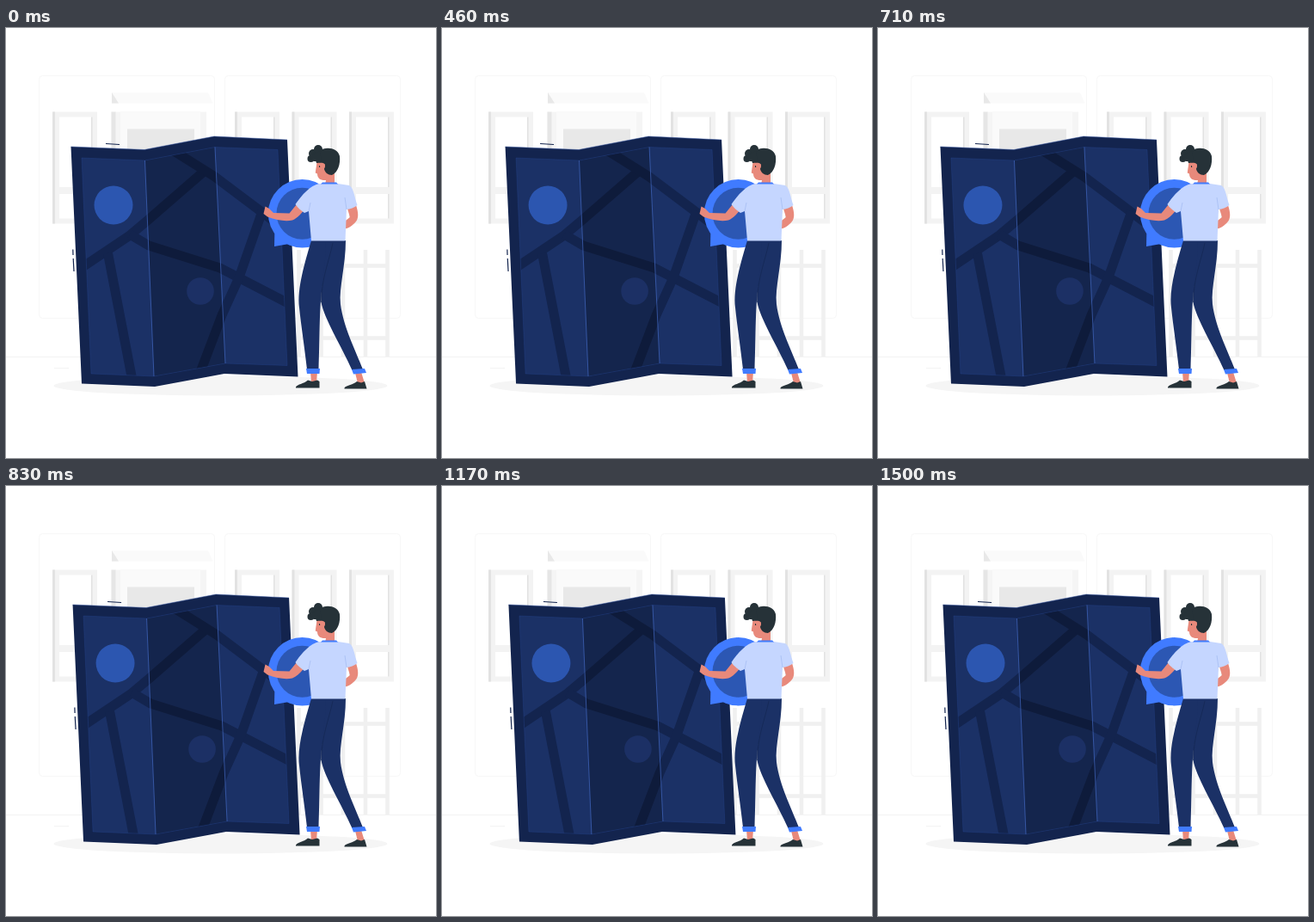
An HTML page for the animation above (1540 ms loop, 500 px wide and 500 px high).

```html
<!DOCTYPE html>
<html lang="en">
<head>
<meta charset="utf-8">
<title>Carrying a folded map</title>
<style>
  html, body { margin: 0; width: 100%; height: 100%; overflow: hidden; background: #fff; }
  svg { display: block; width: 100vw; height: 100vh; }
</style>
</head>
<body>
<svg viewBox="0 0 500 500">
  <defs>
    <g id="window">
      <path fill="#f3f3f3" fill-rule="evenodd" d="M0 97.5H52V227.5H0ZM8 103.5V185H46V103.5ZM8 193V221.5H46V193Z"/>
      <path fill="#e2e2e2" d="M0 97.5H3V227.5H0ZM45 103.5H46.5V185H45ZM45 193H46.5V221.5H45Z"/>
    </g>
    <clipPath id="panels">
      <path d="M88 151L161.500 154L243 138.500L316 141.500L327 392.500L255 390L172 405L99 402Z"/>
    </clipPath>
  </defs>

  <!-- Street -->
  <g fill="#fff" stroke="#f5f5f5" stroke-width=".8">
    <rect x="38.500" y="55.500" width="204" height="282" rx="4"/>
    <rect x="254.500" y="55.500" width="204" height="282" rx="4"/>
    <path d="M0 382.500H500M56 395.500H73" stroke="#f0f0f0"/>
  </g>
  <path fill="#f5f5f5" d="M122.500 97.500H233V200H122.500Z"/>
  <path fill="#e6e6e6" d="M122.500 97.500H127.500V200H122.500Z"/>
  <path fill="#fafafa" d="M133 97.500H226V200H133ZM123 75H235L240.500 87.500H123Z"/>
  <path fill="#e8e8e8" d="M141 117.500H219V200H141ZM123 75L131 87.500H123Z"/>
  <use href="#window" x="54"/>
  <use href="#window" x="266"/>
  <use href="#window" x="332.500"/>
  <use href="#window" x="399"/>
  <path stroke="#f0f0f0" stroke-width="4.500" d="M340.500 258V382M366.500 258V382M392 258V382M418 258V382M443.500 258V382M338 276.500H445M338 360.500H445"/>
  <ellipse cx="249.500" cy="416" rx="194" ry="11.500" fill="#f5f5f5"/>

  <!-- Map -->
  <g id="map">
    <path fill="#13244e" d="M75.500 138L161 141.500L242 126L327 130L339.500 405.500L254 402L173 417L88 413.500Z"/>
    <path fill="none" stroke="#2a4a98" stroke-width=".5" d="M75.500 138L161 141.500L242 126L327 130"/>
    <g clip-path="url(#panels)">
      <path fill="#1b3166" d="M80 130H330V410H80Z"/>
      <g fill="none" stroke="#13244e" stroke-width="11">
        <path d="M86 280L144 241L166 222.500L231 166"/>
        <path d="M192 141L243 173L320 231"/>
        <path d="M144 240L166 253L249 279L330 321"/>
        <path d="M118.500 262L147 410"/>
        <path d="M298 213L271 290L251 334L226 400"/>
      </g>
      <circle cx="125" cy="206" r="22.500" fill="#2c56b0"/>
      <circle cx="226" cy="306" r="15.800" fill="#254087"/>
      <path fill="#000" fill-opacity=".25" d="M161.500 154L243 138.500L255 390L172 405Z"/>
    </g>
    <g fill="none" stroke="#2d50a5" stroke-width=".5">
      <path stroke-opacity=".5" d="M88 151L161.500 154L243 138.500L316 141.500L327 392.500L255 390L172 405L99 402Z"/>
      <path stroke="#4a75d6" stroke-width=".6" d="M161.500 154L172 405M243 138.500L255 390"/>
    </g>
    <path fill="none" stroke="#13244e" stroke-width="1.200" d="M116 134.500L132 135.500M77.800 257.500L78 264M78.200 268L79 283"/>
  </g>

  <!-- Location bubble -->
  <path fill="#407bff" d="M312.500 230L312 254L335 250Z"/>
  <circle cx="344.500" cy="215.700" r="39.700" fill="#407bff"/>
  <circle cx="344.500" cy="215.700" r="30" fill="#2c57b3"/>

  <!-- Person -->
  <g fill="#e8897b">
    <path d="M354 400H362L361 412H355ZM406 401L413 400L417 413L409 413Z"/>
    <path d="M338 205L329.500 215.500L311 215L306 210L301.500 207.500L299.500 216L304 219.500C315 224 326 225 333 223.500C339 221 344 215 348 210Z"/>
    <path d="M397 210L407 206C410 215 410 221 407 225C403 230 398 233 393.500 233.500V225L400 220Z"/>
    <path d="M361.500 155C361 161 360 165 359.800 168.500L362 169.500C362 175 366 177.500 372 177L371 182H382V165L372 155Z"/>
  </g>
  <g fill="#263238">
    <path d="M361 157C358 150 362 143 369 140.500C377 138.500 386 141 388 149C389 158 386 168 379 171C374 171 371 168 370 164L371 159C369 156 366 157 361 157Z"/>
    <circle cx="354.500" cy="152" r="4"/>
    <circle cx="357" cy="146" r="5"/>
    <circle cx="363" cy="141" r="5"/>
    <path d="M353 149L365 143L367 155L358 155ZM364 160L366 160.500V162L364 162Z"/>
    <path d="M337 417.500C339 414 346 414 351 409.500L356 411L362 409.500L364.500 411V418.500H337ZM393.500 418.500C396 415 404 415 408 411L413 412.500L417 411L419.500 419.500H393.500Z"/>
  </g>
  <circle cx="368" cy="160.500" r="3" fill="#e8897b"/>
  <g fill="#1b3166">
    <path d="M355 247H383L369 295C364 315 365 360 363.500 397H350C347 370 343 345 341 325C338 303 348 271 355 247Z"/>
    <path d="M372 247H395C395 276 387 302 389 321C392 347 407 376 415 397L402.500 398C390 370 370 338 366.500 319C365 300 373 272 372 247Z"/>
  </g>
  <path fill="none" stroke="#132650" stroke-width=".6" d="M380 250C376 270 367 290 366.500 319"/>
  <path fill="#407bff" d="M349 396H365L364.500 402H350ZM402 397L417 396L419 401L404 402.500Z"/>
  <path fill="#c5d6ff" d="M364 181L386 181L399 183C404 185 405 196 408.500 206C405 209 400 210.500 396 211L394.500 247.500H355L352 213L347 215C343 212 339 209 336.500 205C344 194 354 183 364 181Z"/>
  <path fill="none" stroke="#9db6ee" stroke-width=".6" d="M352 213L354 203M396 211L394 197"/>
  <path fill="#407bff" d="M366 181.500L368 179.500H384L386 181.500Z"/>
</svg>
<script>
  const map = document.getElementById("map");
  const loop = 1540, fps = 24;
  // Horizontal shake, one stop per tenth of the cycle
  const stops = [0, -1, 2, -4, 4, -4, 4, -4, 2, -1, 0];

  function shake(phase) {
    const x = phase % 1 * 10, i = Math.floor(x);
    return stops[i] + (stops[i + 1] - stops[i]) * (x - i);
  }

  function draw(now) {
    const step = Math.min(36, Math.floor((now % loop + 3.4) * fps / 1000));
    map.setAttribute("transform", `translate(${shake(step / 36 + 0.018) + 0.18})`);
    requestAnimationFrame(draw);
  }
  draw(performance.now());
</script>
</body>
</html>
```
